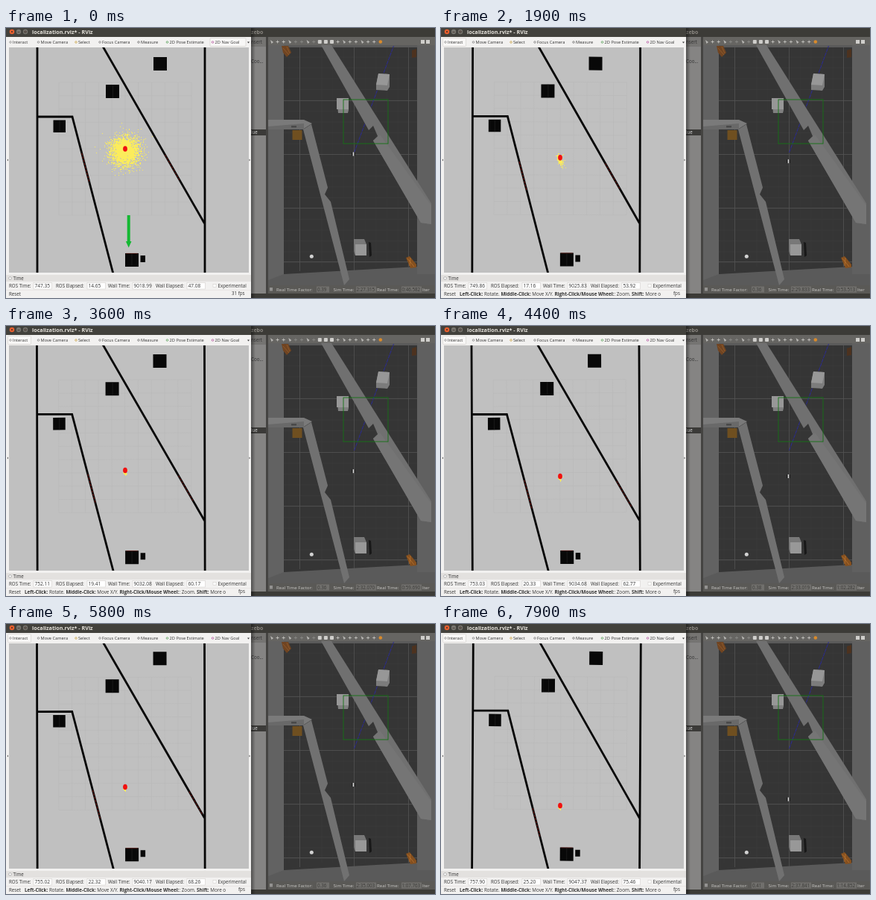
These frames come from a looping animation (576x362 px, 8000 ms). An HTML page:

```html
<!DOCTYPE html>
<html lang="en">
<head>
<meta charset="utf-8">
<title>Robot localization</title>
<style>
html, body { margin: 0; width: 100%; height: 100%; overflow: hidden; background: #3c3b37; }
svg { display: block; width: 576px; height: 362px; font: 6.2px "Open Sans", "Noto Sans", sans-serif; fill: #333; }
.tools { font-size: 5.7px; }
.map { stroke: #050505; stroke-width: 2.8; fill: none; }
.box { fill: #080808; }
.field { fill: #fff; stroke: #cbc8c4; stroke-width: .5; }
.value { font-size: 6.6px; }
.dim { font-size: 6.1px; fill: #c9c8c5; }
.b { font-weight: 700; }
</style>
</head>
<body>
<svg viewBox="0 0 576 362">
  <defs>
    <clipPath id="view"><rect x="4" y="26" width="322" height="302"/></clipPath>
    <clipPath id="world"><rect x="352" y="23" width="224" height="322"/></clipPath>
    <linearGradient id="shade"><stop stop-opacity=".4"/><stop offset="1" stop-opacity="0"/></linearGradient>
  </defs>

  <!-- simulator window -->
  <rect x="328" width="248" height="362" fill="#3c3b37"/>
  <text x="329" y="7.600" font-size="7" class="b" fill="#8a8781">zebo</text>
  <rect x="328" y="12" width="21" height="344" fill="#858483"/>
  <rect x="328" y="12" width="21" height="13" fill="#757472"/>
  <text x="329" y="21">nsert</text>
  <text x="329" y="47">Coo...</text>
  <rect x="328" y="136" width="21" height="8" fill="#3b3a38"/>
  <text x="329" y="142" fill="#ddd">lue</text>
  <rect x="349" y="12" width="3" height="344" fill="#454442"/>
  <rect x="352" y="12" width="224" height="11" fill="#666562"/>
  <g id="icons"></g>
  <path d="M557 16h5v5h-5zM564 16h5v5h-5z" fill="#cfcecb"/>
  <g clip-path="url(#world)">
    <rect x="352" y="23" width="224" height="322" fill="#5a5a5a"/>
    <path d="M352 23h21v307l-21 8z" fill="#626262"/>
    <path d="M552 23h24v307h-24z" fill="#606060"/>
    <path d="M373 26h179v294l-179 10z" fill="#353535"/>
    <path id="floor" stroke="#3d3d3d" stroke-width=".5"/>
    <path d="M394.500 26V326M467.500 26V325M540.500 26V320M373 97.500H552M373 169.500H552M373 241.500H552M373 313.500H552" stroke="#545454" stroke-width=".8"/>
    <path d="M467.500 167L520.500 24" stroke="#2a2a96" stroke-dasharray="5 1"/>
    <path d="M423 23h14L571 235v28l-14-2L493 151l6-6-6-14-6 6z" fill="#707070"/>
    <path d="M493 151l9-8 69 95v25l-14-2z" fill="#757575"/>
    <path d="M352 123h48l11 5-11 7h-48z" fill="#7a7a7a"/>
    <path d="M352 132l48-4v8h-48z" fill="#696969"/>
    <path d="M383 131h7v2.500h-7z" fill="#494949"/>
    <path d="M399 136l11-7 22 85-4 9 8 10 25 104-7 8z" fill="#717171"/>
    <rect x="384.500" y="137" width="13" height="13" fill="#6f4f20"/>
    <path d="M370 24h9l4 9-6 6-5-6z" fill="#704421"/>
    <path d="M372 27l8 9M377 25l4 9" stroke="#95602f" stroke-width=".8"/>
    <path d="M545 30l6-2v11l-6 1z" fill="#4d321f"/>
    <path d="M537 308l5-2 9 11v4l-8 1z" fill="#85501f"/>
    <path d="M539 309l9 11M543 308l-1 11" stroke="#b87430" stroke-width=".8"/>
    <path d="M500 61l15 1v17l-3 5-15-1v-7z" fill="#7c7c7c"/>
    <path d="M500 61l15 1-3 15-15-1z" fill="#979797"/>
    <path d="M444 94h16v16l-1 4h-13z" fill="#808080"/>
    <path d="M444 94h16v15h-16z" fill="#979797"/>
    <path d="M467 283h14l3 7v15h-15l-2-6z" fill="#787878"/>
    <path d="M469 290h15v15h-15z" fill="#989898"/>
    <path d="M487 287l3 1 1 17-3 2z" fill="#181818"/>
    <circle cx="410.300" cy="306.300" r="2.500" fill="#d2d2d2"/>
    <rect x="453" y="96" width="60" height="59" fill="none" stroke="#147214" stroke-width=".9"/>
    <g id="simBot"><rect x="-2.500" y="-2.500" width="5" height="5" fill="#4a4a4a"/><path d="M-2-2.500v5M2-2.500v5" stroke="#1c1c1c"/><path d="M0-2.500v5" stroke="#d0d0d0" stroke-width="1.500"/></g>
  </g>
  <rect x="352" y="345" width="224" height="11" fill="#5a5956"/>
  <path d="M355 348v4.500M357 348v4.500" stroke="#ccc"/>
  <g class="dim">
    <text x="363" y="352.700">Real Time Factor:</text>
    <text x="439.500" y="352.700">Sim Time:</text>
    <text x="498" y="352.700">Real Time:</text>
    <text x="559" y="352.700">Iter</text>
  </g>
  <path d="M417 346.500h17v8h-17zM470 346.500h27v8h-27zM531 346.500h27v8h-27z" fill="#706f6c"/>
  <g fill="#3b3a38"><text id="factor" x="418" y="352.700"/><text id="sim" x="470.500" y="352.700"/><text id="real" x="531.500" y="352.700"/></g>
  <rect x="329" width="6" height="362" fill="url(#shade)"/>

  <!-- viewer window -->
  <rect width="329" height="362" fill="#f2f1f0"/>
  <rect width="329" height="12" fill="#42413c"/>
  <circle cx="8" cy="5" r="3.300" fill="#e9602f"/>
  <circle cx="17" cy="5" r="3.200" fill="#77756f"/>
  <circle cx="26" cy="5" r="3.200" fill="#77756f"/>
  <path d="M6.800 3.800l2.400 2.400m0-2.400l-2.400 2.400M15.500 5.500h3M24.800 4h2.400v2.200h-2.400z" stroke="#3a2a24" stroke-width=".7" fill="none"/>
  <text x="35" y="7.700" font-size="7.200" class="b" fill="#e6e3dc">localization.rviz* - RViz</text>
  <rect id="active" y="13.500" height="11" rx="1" fill="#f8f7f6" stroke="#d2cfcb" stroke-width=".6"/>
  <g id="tools" class="tools"></g>
  <path d="M324 18.500h3l-1.500 2z"/>

  <g clip-path="url(#view)">
    <rect x="4" y="26" width="322" height="302" fill="#c0c0c0"/>
    <g id="map">
      <path id="grid" stroke="#b7b7b7" stroke-width=".5"/>
      <path class="map" d="M42 10V345M267 10V345M121.500 10L266.500 262M42 119H89L148 345"/>
      <path class="box" d="M198 39h18v18h-18zM134 76h18v18h-18zM63.500 123.500h16.500v16.500h-16.500zM160 302h18v18h-18zM180.500 305h6.500v9h-6.500z"/>
      <path d="M143.500 76v18M72 124v16M169 302v17" stroke="#2a2a2a" stroke-width=".5"/>
      <path id="scan" stroke="#9c1c14" stroke-width=".8" stroke-dasharray="3 1.500" fill="none"/>
      <path d="M161 302.300h16" stroke="#6d1a14" stroke-width=".6"/>
    </g>
    <path id="goal" d="M162.700 251h4v35h1.800l-3.800 8.500-3.800-8.500h1.800z" fill="#14b832"/>
    <path id="cloud" fill="#fbec5c"/>
    <ellipse id="bot" rx="2.900" ry="3.800" fill="#f01010"/>
  </g>
  <path d="M1.500 177l1.500-1.500v3zM328 177l-1.500-1.500v3z" fill="#555"/>

  <rect y="331" width="329" height="9" fill="#e3e1df"/>
  <circle cx="5.500" cy="335.500" r="1.800" fill="#fff" stroke="#888" stroke-width=".6"/>
  <text x="9.500" y="337.700">Time</text>
  <g id="clocks"></g>
  <rect x="278" y="343.500" width="4" height="4" class="field"/>
  <text x="284.500" y="348">Experimental</text>
  <path d="M0 351.500h329" stroke="#dedbd8" stroke-width=".5"/>
  <text x="4" y="358.800">Reset</text>
  <text id="hint" x="25" y="358.800" font-size="6.300"><tspan class="b">Left-Click:</tspan> Rotate. <tspan class="b">Middle-Click:</tspan> Move X/Y. <tspan class="b">Right-Click/Mouse Wheel:</tspan>: Zoom. <tspan class="b">Shift:</tspan> More o</text>
  <text id="fps" y="358">31 fps</text>
</svg>

<script>
const $ = id => document.getElementById(id);
const LOOP = 8000, RELEASE = 300;
const times = [0, 1200, 2700, 4400, 5800, 7200, 7900];
const tracks = {
  y: [162, 164.5, 184.5, 201.5, 218.5, 234, 243.5],
  simY: [169, 171.5, 187, 201.5, 215.5, 228, 235],
  turn: [0, .27, 0, -.25, -.12, -.35, .32],
  lift: [0, -.4, -.6, -1, -1.7, -2, -2.4],
  spreadX: [9.5, 2.2, 1.3, 1.1, 1, 1, 1],
  spreadY: [9.5, 5.8, 1.6, 1.3, 1.2, 1.2, 1.2],
  count: [3400, 330, 60, 35, 30, 30, 30],
  ros: [747.35, 748.8, 751.07, 753.03, 755.02, 756.77, 757.9],
  wall: [47.08, 51.01, 57.24, 62.77, 68.26, 72.61, 75.46],
  sim: [27.315, 28.811, 31.002, 33.019, 35.003, 36.74, 37.841],
  real: [46.582, 50.661, 56.773, 62.282, 67.763, 72.21, 74.852],
  factor: [.39, .38, .33, .38, .36, .4, .41]
};

function at(name, t) {
  const v = tracks[name];
  let i = 0;
  while (i < times.length - 2 && t >= times[i + 1]) i++;
  return v[i] + (v[i + 1] - v[i]) * (t - times[i]) / (times[i + 1] - times[i]);
}

let seed = 7;
function random() {
  seed = (seed * 16807) % 2147483647;
  return seed / 2147483647;
}
const particles = Array.from({ length: tracks.count[0] }, () => {
  const r = Math.sqrt(-2 * Math.log(random())), a = random() * 2 * Math.PI;
  return [r * Math.cos(a), r * Math.sin(a)];
});

const label = (x, y, s, extra = '') => `<text x="${x}" y="${y}" ${extra}>${s}</text>`;

$('tools').innerHTML = [[9, 'Interact', '#888'], [46.5, 'Move Camera', '#777'], [97, 'Select', '#c8a03c'], [129, 'Focus Camera', '#777'],
  [181, 'Measure', '#666'], [219.5, '2D Pose Estimate', '#4a9a4a'], [280.5, '2D Nav Goal', '#b04a9a']]
  .map(([x, s, color]) => `<circle cx="${x - 3}" cy="19" r="1.300" fill="none" stroke="${color}" stroke-width=".7"/>` + label(x, 20.8, s)).join('');

$('clocks').innerHTML = [[4, 37, 'ROS Time:'], [67, 109, 'ROS Elapsed:'], [137, 170, 'Wall Time:'], [201, 243, 'Wall Elapsed:']]
  .map(([x, bx, s], i) => label(x, 348, s) + `<rect class="field" x="${bx}" y="341.500" width="24.500" height="8.500"/>` +
    label(bx + 1.5, 348, '', `class="value" id="clock${i}"`)).join('');

$('icons').innerHTML = Array.from({ length: 19 }, (_, i) => {
  const x = 356 + i * 8.1;
  if (i > 7 && i < 11) return `<rect x="${x - 2}" y="16" width="5" height="5" rx="1" fill="#cfcecb"/>`;
  if (i === 18) return `<circle cx="${x + 1}" cy="18.500" r="2.300" fill="#d98a2b"/>`;
  return i % 3 ? `<path d="M${x - 1.5} 18.500h4m-2-2v4" stroke="${i > 3 && i < 8 ? '#8a8986' : '#c4c3c0'}" stroke-width=".9"/>`
    : `<path d="M${x - 1} 16l4 3-2.500 2z" fill="#b9b8b5"/>`;
}).join('');

let lines = '';
for (let i = 0; i <= 10; i++) {
  const d = i * 17.8;
  lines += `M${71 + d} 73v178M71 ${73 + d}h178`;
}
$('grid').setAttribute('d', lines);

let tiles = '';
for (let x = 380; x < 552; x += 14.6) tiles += `M${x} 26V320`;
for (let y = 39; y < 320; y += 14.5) tiles += `M373 ${y}H552`;
$('floor').setAttribute('d', tiles);

function cloudPath(t, y) {
  const sx = at('spreadX', t), sy = at('spreadY', t), n = at('count', t);
  const lean = .28 * Math.min(1, t / 1200);
  let d = '';
  for (let i = 0; i < n; i++) {
    const [a, b] = particles[i];
    const dy = b * sy;
    d += `M${Math.round(159.5 + a * sx + dy * lean)} ${Math.round(y + 3 + dy)}h1v1h-1z`;
  }
  return d;
}

function scanPath(y) {
  const left = v => `${89 + (v - 119) * .261} ${v}`;
  const right = v => `${130.7 + (v - 26) * .575} ${v}`;
  let d = `M${left(y + 6)}L${left(y + 44)}`;
  if (y < 230) d += `M${right(y + 8)}L${right(Math.min(258, y + 42))}`;
  return d;
}

function draw(t) {
  const y = at('y', t), dragging = t < RELEASE;
  $('map').setAttribute('transform', `translate(0 ${at('lift', t)}) rotate(${at('turn', t)} 160 262)`);
  $('scan').setAttribute('d', scanPath(y));
  $('cloud').setAttribute('d', cloudPath(t, y));
  $('bot').setAttribute('transform', `translate(160 ${y})`);
  $('simBot').setAttribute('transform', `translate(466.500 ${at('simY', t)})`);

  $('goal').style.display = dragging ? '' : 'none';
  $('hint').style.display = dragging ? 'none' : '';
  $('fps').textContent = dragging ? '31 fps' : 'fps';
  $('fps').setAttribute('x', dragging ? 303 : 312);
  $('active').setAttribute('x', dragging ? 274 : 2.5);
  $('active').setAttribute('width', dragging ? 48 : 31);

  const ros = at('ros', t), wall = at('wall', t), real = at('real', t);
  [ros, ros - 732.695, 8971.91 + wall, wall].forEach((v, i) => $('clock' + i).textContent = v.toFixed(2));
  $('factor').textContent = at('factor', t).toFixed(2);
  $('sim').textContent = '2:' + at('sim', t).toFixed(3);
  $('real').textContent = Math.floor(real / 60) + ':' + (real % 60).toFixed(3).padStart(6, '0');
}

const start = performance.now();
let shown = -1;
function frame(now) {
  const step = Math.floor(Math.max(0, now - start) % LOOP / 100);
  if (step !== shown) draw((shown = step) * 100);
  requestAnimationFrame(frame);
}
draw(0);
requestAnimationFrame(frame);
</script>
</body>
</html>
```
